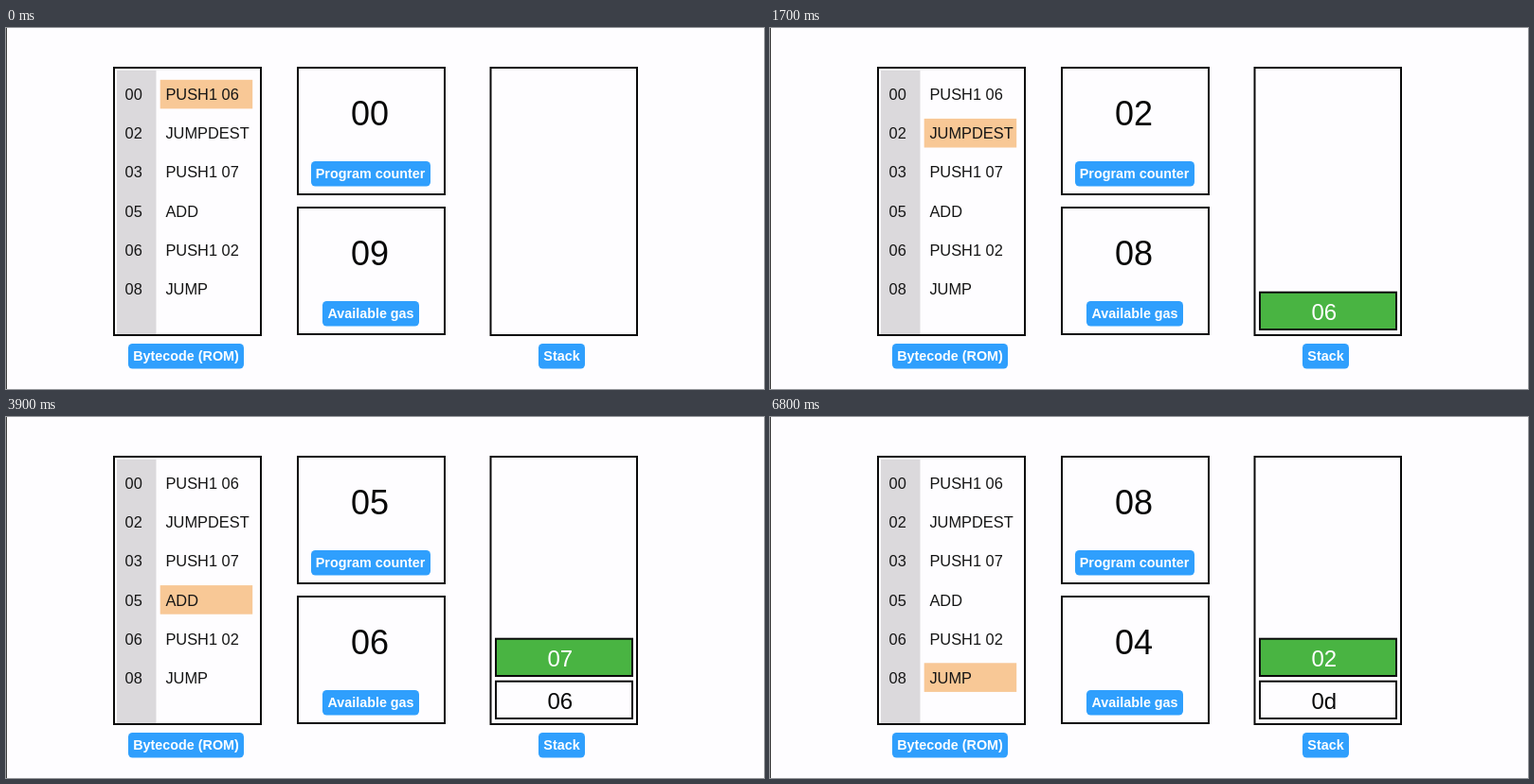
These frames come from a looping animation (800x382 px, 8 s). An HTML page:

```html
<!DOCTYPE html>
<html lang="en">
<head>
<meta charset="utf-8">
<title>Stack machine</title>
<style>
html, body { margin: 0; width: 100%; height: 100%; overflow: hidden; background: #fefdff; }
svg { display: block; width: 800px; height: 382px; font-family: "Liberation Sans", Arial, sans-serif; }
.box { fill: none; stroke: #0a0a0a; stroke-width: 2; }
.code { font-size: 16.4px; fill: #151515; }
.mid { text-anchor: middle; }
.big { font-size: 36px; fill: #080808; }
.cell { font-size: 24px; }
.tag { font-size: 14.35px; font-weight: bold; fill: #fff; }
</style>
</head>
<body>
<svg id="stage" viewBox="0 0 800 382"></svg>
<script>
const LOOP = 8000, ROW = 41.1;
const stage = document.getElementById("stage");

function add(name, attrs, text) {
  const el = document.createElementNS("http://www.w3.org/2000/svg", name);
  for (const key in attrs) el.setAttribute(key, attrs[key]);
  if (text !== undefined) el.textContent = text;
  return stage.appendChild(el);
}
const rect = (x, y, width, height, more) => add("rect", { x, y, width, height, ...more });
const label = (x, y, cls, text) => add("text", { x, y, class: cls, "xml:space": "preserve" }, text);

function tag(x, y, w, h, cx, text) {
  rect(x, y, w, h, { rx: 4.5, fill: "#2f9ffd" });
  label(cx, y + 17.5, "tag mid", text);
}

const program = [
  ["00", "PUSH1 06"], ["02", "JUMPDEST"], ["03", "PUSH1 07"],
  ["05", "ADD"], ["06", "PUSH1 02"], ["08", "JUMP"]
];

// Stack values run bottom to top; fresh is the index of the green cell.
const steps = [
  { at: 0, stack: [], fresh: -1 },
  { at: 1500, stack: ["06"], fresh: 0 },
  { at: 2600, stack: ["06"], fresh: 0 },
  { at: 3900, stack: ["06", "07"], fresh: 1 },
  { at: 5300, stack: ["0d"], fresh: 0 },
  { at: 6700, stack: ["0d", "02"], fresh: 1 }
];

rect(0, 0, 800, 382, { fill: "#fefdff" });
rect(0, 0, 1, 382, { fill: "#3c3c3c" });
rect(117, 45, 41.5, 279, { fill: "#dbd9dc" });
const mark = rect(162.7, 54.8, 97.5, 30.6, { fill: "#f8c896" });

program.forEach(([address, op], i) => {
  const y = 76.2 + i * ROW;
  label(125.6, y, "code", address);
  label(168.4, y, "code", op);
});

rect(114, 42, 155, 283, { class: "box" });
rect(308, 42, 155, 134, { class: "box" });
rect(308, 190, 155, 134, { class: "box" });
rect(511.5, 42, 154.5, 283, { class: "box" });

tag(322, 141, 126, 26.5, 384.6, "Program counter");
tag(334, 289, 102, 26.5, 385, "Available gas");
tag(129, 334, 122, 26.5, 190, "Bytecode (ROM)");
tag(562, 334, 49, 26.5, 586.5, "Stack");

const counter = label(384, 103.3, "big mid");
const gas = label(384, 251.3, "big mid");
const cells = [279.7, 234.7].map(y => ({
  box: rect(517, y, 144, 39.3, { class: "box" }),
  text: label(584.8, y + 29.6, "cell mid")
}));

function draw(time) {
  let n = steps.length - 1;
  while (steps[n].at > time) n--;
  const { stack, fresh } = steps[n];
  mark.setAttribute("y", 54.8 + n * ROW);
  counter.textContent = program[n][0];
  gas.textContent = "0" + (9 - n);
  cells.forEach(({ box, text }, i) => {
    const isFresh = i === fresh;
    box.style.display = i < stack.length ? "" : "none";
    box.style.fill = isFresh ? "#49b442" : "none";
    text.style.fill = isFresh ? "#fff" : "#080808";
    text.textContent = stack[i] || "";
  });
}

let start;
function tick(now) {
  if (start === undefined) start = now;
  draw((now - start) % LOOP);
  requestAnimationFrame(tick);
}
draw(0);
requestAnimationFrame(tick);
</script>
</body>
</html>
```
